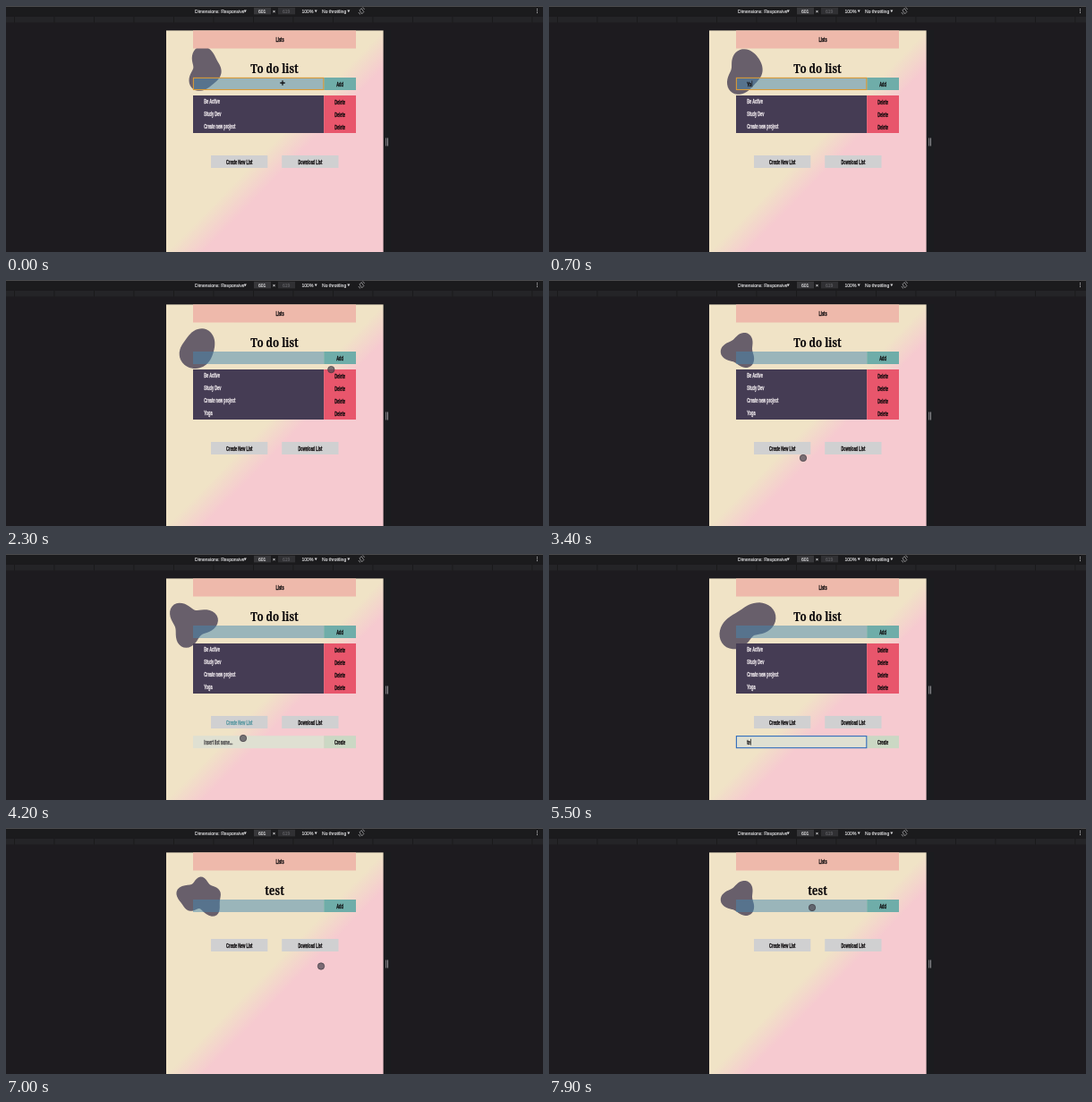
Write an HTML page that moves like this. It is 600x275 px and loops after 8 s.

```html
<!DOCTYPE html>
<html lang="en">
<head>
<meta charset="utf-8">
<title>To do list</title>
<style>
  html, body { margin: 0; width: 100%; height: 100%; overflow: hidden; background: #1d1b1f; }
  svg { display: block; width: 600px; height: 275px; }
  text { fill: currentColor; stroke: currentColor; }
  .narrow { font: bold 7px "Liberation Sans", Arial, sans-serif; stroke-width: .3; }
  .title { font: 900 14px "Noto Serif", "Liberation Serif", serif; text-anchor: middle; stroke-width: .2; }
  .tool { font: 5.05px "Liberation Sans", Arial, sans-serif; stroke-width: .12; }
  .mid { text-anchor: middle; }
</style>
</head>
<body>
<svg id="stage" viewBox="0 0 600 275"></svg>
<script>
const LOOP = 8000, STEP = 100;
const ADD_AT = 2000, FORM_AT = 3800, FOCUS_AT = 4500, CREATE_AT = 6800;
const LEFT = 209, SPLIT = 355.2, RIGHT = 391, ROW = 14;
const INK = "#0d0a0c";
const tasks = ["Be Active", "Study Dev", "Create new project", "Yoga"];

const rect = (x, y, w, h, fill, more = "") =>
  `<rect x="${x}" y="${y}" width="${w}" height="${h}" fill="${fill}" ${more}/>`;
const ring = (id, y, color) =>
  rect(LEFT + .4, y, SPLIT - LEFT - .8, 13.1, "none", `id="${id}" stroke="${color}" stroke-width="1.1"`);
const narrow = (x, y, str, color = INK, id = "", cls = "") =>
  `<text class="narrow ${cls}" id="${id}" color="${color}" transform="translate(${x} ${y}) scale(.56 1)">${str}</text>`;
const centred = (x, y, str, id = "") => narrow(x, y, str, INK, id, "mid");
const entry = (y, str, color, id) => narrow(221.3, y, str, color, id);
const tool = (x, str, color = "#e4e4e6") => `<text class="tool" color="${color}" x="${x}" y="7.5">${str}</text>`;
const arrow = x => `<path d="M${x} 4.5h3l-1.5 2.7z" fill="#dcdcde"/>`;
const repeat = (n, make) => Array.from({ length: n }, (_, i) => make(i)).join("");
const bar = (y, left, right, label) =>
  rect(LEFT, y, SPLIT - LEFT, ROW, left) + rect(SPLIT, y, RIGHT - SPLIT, ROW, right)
  + centred(373, y + 9.7, label);
const button = (x, label, id) => rect(x, 0, 63.3, ROW, "#d0d0d1") + centred(x + 31.7, 9.6, label, id);

const toolbar = rect(0, 0, 600, 11.5, "#1b1b1d") + rect(0, 0, 600, 1, "#4b4b4e")
  + rect(0, 12, 600, 6.5, "#242427") + repeat(14, i => rect(9 + i * 44.5, 12, .8, 6.5, "#18181a"))
  + tool(211, "Dimensions: Responsive") + arrow(265.8)
  + rect(277, 1.8, 19, 7.6, "#37373a") + tool(282, "601") + tool(298, "×")
  + rect(304, 1.8, 19, 7.6, "#303033") + tool(309, "619", "#626266")
  + tool(330.5, "100%") + arrow(344.7) + tool(353, "No throttling") + arrow(381.3)
  + '<path d="M395 4.8l2.2-2.2 2.6 4-2.2 2.2zM394 7a3.6 3.6 0 0 0 2 2.3M398.5 1.6a3.6 3.6 0 0 1 2 2.3" fill="none" stroke="#a5a5a8" stroke-width=".8"/>'
  + repeat(3, i => rect(593, 3 + i * 2, 1, 1, "#c8c8ca"));

const $ = id => document.getElementById(id);
const show = (el, on) => { el.style.display = on ? "" : "none"; };

$("stage").innerHTML = `<linearGradient id="sky" x2="1" y2="1">
    <stop offset=".5" stop-color="#f0e3c6"/><stop offset=".585" stop-color="#f6cad0"/></linearGradient>`
  + toolbar
  + rect(421, 27, 9, 248, "#1b1c1f") + repeat(2, i => rect(424.2 + i * 1.8, 147.5, 1, 9, "#8c8c90"))
  + rect(179, 27.4, 242.6, 248, "url(#sky)")
  + '<path id="blob" fill="#685f6b"/>'
  + rect(LEFT, 27.4, RIGHT - LEFT, 20.1, "#eeb9ab") + centred(306, 40.2, "Lists")
  + `<text id="title" class="title" color="${INK}" transform="translate(300 75.4) scale(.83 1)"></text>`
  + bar(80, "rgba(70,135,175,.5)", "#6fada9", "Add") + ring("ring", 80.4, "#d99a38") + entry(89.6, "", INK, "task")
  + tasks.map((name, i) => `<g class="row">${bar(100 + i * ROW, "#453c54", "#e8566c", "Delete")}${
      entry(109.4 + i * ROW, name, "#eee8ec", "")}</g>`).join("")
  + `<g id="buttons">${button(229, "Create New List", "newList")}${button(308.2, "Download List", "")}</g>`
  + `<g id="form">${bar(203.2, "#dfe0d2", "#cbd8c4", "Create")}${ring("formRing", 203.6, "#2f6cbc")}${
      entry(213, "Insert list name...", "#4c4b4c", "hint")}${entry(213, "", INK, "name")}</g>`
  + rect(0, 0, .7, 7, "#111", 'id="caret"')
  + `<g id="cursor"><circle id="dot" r="3.7" fill="#4b4650" fill-opacity=".72" stroke="#39353d" stroke-opacity=".8" stroke-width=".8"/>
     <path id="cross" d="M-2.7 0H2.7M0-2.7V2.7" fill="none" stroke="#15151a" stroke-width="1.3"/></g>`;

// Blob pose: centre, mean radius, and waves of [lobes, height, direction in degrees].
const pose = (x, y, r, ...waves) => Array.from({ length: 60 }, (_, i) => {
  const a = i * Math.PI / 30;
  const d = waves.reduce((sum, [n, h, deg]) => sum + h * Math.cos(n * (a - deg * Math.PI / 180)), r);
  return [x + d * Math.cos(a), y + d * Math.sin(a)];
}).flat();

const bean = pose(213, 79, 17.7, [3, 3.6, 55]);
const blob = [
  [0, pose(222, 71, 20, [2, 4.2, 95], [3, 3, 130])],
  [1400, pose(215, 76, 22.5, [2, 5, 120], [3, 1.5, 0])],
  [3400, bean],
  [4200, pose(207, 78, 23, [2, 1.5, 0], [3, 6, -13])],
  [5500, pose(221, 79, 25, [2, 9, 148], [3, 1.5, 0])],
  [6500, pose(219, 76, 22.5, [2, 5, 15], [3, 2.5, 40], [5, 3.5, -18])],
  [7900, bean]
];
const cursor = [
  [0, [309, 86]], [1400, [343, 87]], [2000, [373, 88]], [3400, [284, 199]],
  [3800, [262, 189]], [4200, [265, 206]], [6100, [368, 235]], [6500, [385, 212]],
  [6800, [374, 210]], [7200, [330, 99]], [7900, [294, 89]]
];

// Eased value of a track of [time, numbers].
function at(track, t) {
  const i = track.findIndex(key => key[0] > t);
  if (i < 0) return track[track.length - 1][1];
  const [t0, a] = track[i - 1], [t1, b] = track[i];
  const e = (1 - Math.cos(Math.PI * (t - t0) / (t1 - t0))) / 2;
  return a.map((v, k) => v + (b[k] - v) * e);
}

const typed = (word, from, pace, t) => word.slice(0, Math.max(0, Math.floor((t - from) / pace) + 1));
const within = (t, from, to) => t >= from && t < to;

function draw(t) {
  const added = t >= ADD_AT, made = t >= CREATE_AT;
  const count = made ? 0 : added ? 4 : 3;
  const name = typed("test", 5300, 200, t);

  $("blob").setAttribute("d", `M${at(blob, t).map(v => v.toFixed(2)).join(" ")}Z`);
  $("title").textContent = made ? "test" : "To do list";
  $("task").textContent = added ? "" : typed("Yoga", 500, 180, t);
  show($("ring"), !added);
  document.querySelectorAll(".row").forEach((el, i) => show(el, i < count));
  $("buttons").setAttribute("transform", `translate(0 ${made ? 124 : 125 + count * ROW})`);
  $("newList").setAttribute("color", within(t, 3700, FOCUS_AT) ? "#5797a0" : INK);

  show($("form"), within(t, FORM_AT, CREATE_AT));
  show($("formRing"), t >= FOCUS_AT);
  show($("hint"), !name);
  $("name").textContent = name;

  const field = within(t, 400, 1200) ? $("task") : within(t, 4900, 6100) ? $("name") : null;
  show($("caret"), field);
  if (field) {
    $("caret").setAttribute("x", 221.8 + field.getComputedTextLength() * .56);
    $("caret").setAttribute("y", field.id === "task" ? 83.5 : 206.7);
  }
  show($("cursor"), !field);
  $("cursor").setAttribute("transform", `translate(${at(cursor, t)})`);
  show($("cross"), t < 400);
  show($("dot"), t >= 400);
}

const start = performance.now();
function tick() {
  const t = (performance.now() - start) % LOOP;
  draw(Math.floor(t / STEP) * STEP);
  requestAnimationFrame(tick);
}
tick();
</script>
</body>
</html>
```
